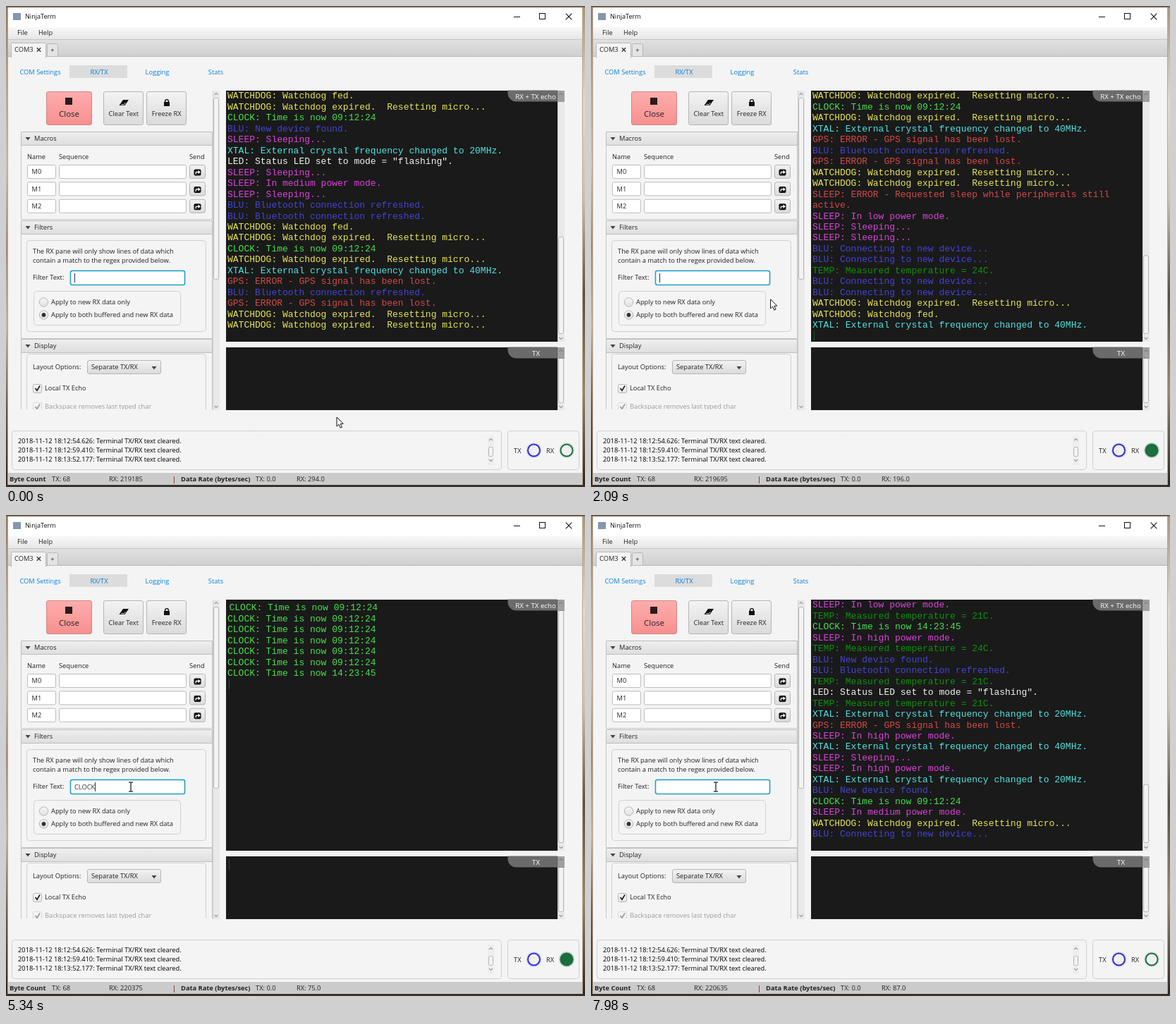
Recreate the animation shown at these times as an HTML page with a canvas. Size 821 by 682 pixels, loop 8000 ms.

```html
<!DOCTYPE html>
<html lang="en">
<head>
<meta charset="utf-8">
<title>NinjaTerm</title>
<style>
html, body { margin: 0; width: 100%; height: 100%; overflow: hidden; background: #f4f4f4; }
canvas { display: block; width: 821px; height: 682px; }
</style>
</head>
<body>
<canvas id="stage" width="821" height="682"></canvas>
<script>
const ctx = document.getElementById('stage').getContext('2d');
const LOOP = 8000;
const UI = '"Open Sans", "Noto Sans", sans-serif';
const MONO = '13px "Liberation Mono", "Courier New", monospace';

// ---- serial data ----
const MESSAGES = {
  f: 'WATCHDOG: Watchdog fed.',
  x: 'WATCHDOG: Watchdog expired.  Resetting micro...',
  c: 'CLOCK: Time is now 09:12:24',
  k: 'CLOCK: Time is now 14:23:45',
  n: 'BLU: New device found.',
  r: 'BLU: Bluetooth connection refreshed.',
  t: 'BLU: Connecting to new device...',
  s: 'SLEEP: Sleeping...',
  l: 'SLEEP: In low power mode.',
  m: 'SLEEP: In medium power mode.',
  h: 'SLEEP: In high power mode.',
  e: 'SLEEP: ERROR - Requested sleep while peripherals still active.',
  2: 'XTAL: External crystal frequency changed to 20MHz.',
  4: 'XTAL: External crystal frequency changed to 40MHz.',
  L: 'LED: Status LED set to mode = "flashing".',
  g: 'GPS: ERROR - GPS signal has been lost.',
  T: 'TEMP: Measured temperature = 24C.',
  U: 'TEMP: Measured temperature = 21C.'
};
const COLORS = {
  WATCHDOG: '#e8e655', CLOCK: '#48e04c', BLU: '#4444d2', SLEEP: '#dc42dc',
  XTAL: '#50e2e2', LED: '#f4f4f4', TEMP: '#0b930b'
};
const decode = keys => [...keys].map(k => MESSAGES[k]);
const HISTORY = decode('cccc' + 'f'.repeat(8) + 's'.repeat(17) + 'Ttx' + 'fxcns2Lsmsrrfxcx4grgxx');
const INCOMING = decode('elssttTttxf4slUkhTnrULU2gh4sh2ncmxt');
const ARRIVALS = [
  230, 390, 540, 690, 810, 890, 1150, 1310, 1460, 1700, 1850, 2085,
  2320, 2550, 2780, 2970, 3160, 4030, 4030, 4030,
  4720, 4800, 4880, 4950, 5030, 5110, 5190, 5270, 5340, 5430, 5600, 6270,
  6700, 7060, 7210
];
const FIRST_BYTES = 219185;
const OPEN_LINE = { count: 17, from: 3160, to: 4030 };   // newline still pending
const HELD = { count: 18, until: 4340 };                 // display lags the counter

// [time, value] steps
const FILTER = [[0, ''], [4340, 'C'], [4500, 'CL'], [4800, 'CLO'], [5000, 'CLOC'], [5200, 'CLOCK'],
  [5700, 'CLOC'], [5900, 'CLO'], [6430, 'CL'], [6510, 'C'], [7440, '']];
const RATE = [[0, 294], [800, 204], [1800, 196], [2800, 126], [3800, 249], [4800, 75], [5800, 45], [6800, 87]];
const stepAt = (steps, t) => steps.filter(s => s[0] <= t).pop();

// ---- drawing helpers ----
function text(str, x, mid, { size = 9.3, color = '#222', bold = false, align = 'left' } = {}) {
  ctx.font = `${bold ? 'bold ' : ''}${size}px ${UI}`;
  ctx.fillStyle = color;
  ctx.textAlign = align;
  ctx.fillText(str, x, mid + size * 0.36);
}
function rect(x, y, w, h, fill) {
  ctx.fillStyle = fill;
  ctx.fillRect(x, y, w, h);
}
function shade(y, h, ...stops) {
  const g = ctx.createLinearGradient(0, y, 0, y + h);
  stops.forEach((c, i) => g.addColorStop(i / (stops.length - 1), c));
  return g;
}
function box(x, y, w, h, r, fill, stroke, width = 1) {
  ctx.beginPath();
  ctx.roundRect(x + 0.5, y + 0.5, w - 1, h - 1, r);
  if (fill) { ctx.fillStyle = fill; ctx.fill(); }
  if (stroke) { ctx.strokeStyle = stroke; ctx.lineWidth = width; ctx.stroke(); }
}
function line(points, color, width = 1) {
  ctx.beginPath();
  points.forEach(p => ctx.lineTo(...p));
  ctx.strokeStyle = color;
  ctx.lineWidth = width;
  ctx.stroke();
}
function poly(points, fill) {
  ctx.beginPath();
  points.forEach(p => ctx.lineTo(...p));
  ctx.closePath();
  ctx.fillStyle = fill;
  ctx.fill();
}
function circle(x, y, r, fill, stroke, width = 1) {
  ctx.beginPath();
  ctx.arc(x, y, r, 0, Math.PI * 2);
  if (fill) { ctx.fillStyle = fill; ctx.fill(); }
  if (stroke) { ctx.strokeStyle = stroke; ctx.lineWidth = width; ctx.stroke(); }
}
function cross(x, y, r, color, width) {
  line([[x - r, y - r], [x + r, y + r]], color, width);
  line([[x - r, y + r], [x + r, y - r]], color, width);
}
const button = (x, y, w, h) => box(x, y, w, h, 2.5, shade(y, h, '#f3f3f3', '#dadada'), '#b6b6b6');
const downArrow = (x, y) => poly([[x - 3.5, y - 2], [x + 3.5, y - 2], [x, y + 2.5]], '#444');
function chevron(x, y, dir, color = '#999') {
  line([[x - 2.5, y + dir], [x, y - dir * 1.5], [x + 2.5, y + dir]], color, 1.1);
}
function scrollbar(x, top, bottom, thumbTop, thumbBottom) {
  rect(x, top, 10, bottom - top, '#e9e9e9');
  line([[x + 0.5, top], [x + 0.5, bottom]], '#d2d2d2');
  box(x + 1, thumbTop, 8, thumbBottom - thumbTop, 2, '#f3f3f3', '#b4b4b4');
  chevron(x + 5, top + 5, 1);
  chevron(x + 5, bottom - 5, -1);
}

// ---- window parts ----
function frame() {
  rect(0, 0, 821, 682, shade(0, 682, '#8d7763', '#b9a58d', '#cdbfae', '#a08a74', '#c8b6a0', '#6b5849', '#2c2622'));
  rect(817, 0, 4, 682, shade(0, 682, '#a8947f', '#e2dacd', '#cfc1b0', '#5a4d42', '#9a866f', '#2a2420'));
  rect(0, 0, 821, 2, '#6f5b49');
  rect(0, 679, 821, 3, '#3a312b');
  rect(2, 2, 816, 677, '#f4f4f4');
  rect(3, 3, 814, 27, '#fff');
  line([[2.5, 2], [2.5, 679]], '#b9a48e');
  line([[817.5, 2], [817.5, 679]], '#b9a48e');
  rect(10, 10, 11, 10, '#8497ae');
  text('NinjaTerm', 27, 15, { size: 9.1, color: '#111' });
  line([[720, 15.5], [729, 15.5]], '#111');
  ctx.strokeRect(756.5, 10.5, 8, 8);
  cross(798, 15, 4.3, '#111', 1.1);

  rect(3, 30, 814, 18, shade(30, 18, '#f8f8f8', '#e6e6e6'));
  text('File', 16, 38);
  text('Help', 46, 38);
  rect(3, 48, 814, 24, shade(48, 24, '#e0e0e0', '#cfcfcf'));
  line([[3, 47.5], [817, 47.5]], '#c6c6c6');
  line([[3, 71.5], [817, 71.5]], '#b8b8b8');
  box(7, 52, 50, 22, [2, 2, 0, 0], '#f4f4f4', '#b8b8b8');
  rect(8, 71, 48, 4, '#f4f4f4');
  text('COM3', 12, 62);
  cross(46.5, 62, 2.7, '#333', 1.3);
  box(58, 53, 16, 19, [2, 2, 0, 0], '#e4e4e4', '#b8b8b8');
  text('+', 66, 62.5, { align: 'center' });

  rect(90, 84, 82, 18, '#dcdcdc');
  [['COM Settings', 48.5], ['RX/TX', 132], ['Logging', 214.5], ['Stats', 297.5]]
    .forEach(([label, x]) => text(label, x, 94, { color: '#087fdd', align: 'center' }));
}

function actionButtons() {
  box(57, 121, 65, 48, 2.5, shade(121, 48, '#ffadad', '#f78f8f'), '#cf8585');
  rect(84, 130, 10, 10, '#2a1a1a');
  text('Close', 89.5, 153, { size: 11.5, align: 'center' });
  button(138, 121, 57, 48);
  poly([[160.5, 141], [166, 133], [174, 133], [168.5, 141]], '#111');
  line([[163.2, 139.8], [167.5, 139.8], [169.2, 137.4]], '#e2e2e2', 1);
  text('Clear Text', 166.7, 153, { align: 'center' });
  button(199, 121, 57, 48);
  rect(224, 136, 8, 6, '#111');
  ctx.beginPath();
  ctx.arc(228, 135, 2.4, Math.PI, 0);
  ctx.lineTo(230.4, 137);
  ctx.moveTo(225.6, 135);
  ctx.lineTo(225.6, 137);
  ctx.strokeStyle = '#111';
  ctx.lineWidth = 1.4;
  ctx.stroke();
  text('Freeze RX', 227.7, 153, { align: 'center' });
}

function pane(title, y, bottom) {
  box(21, y, 272, bottom - y, 0, '#f4f4f4', '#c6c6c6');
  box(21, y, 272, 20, [2, 2, 0, 0], shade(y, 20, '#efefef', '#dedede'), '#bdbdbd');
  downArrow(31, y + 10);
  text(title, 40, y + 10);
}

function macros() {
  pane('Macros', 178, 303);
  text('Name', 30, 214);
  text('Sequence', 75, 214);
  text('Send', 260, 214);
  for (let i = 0; i < 3; i++) {
    const y = 225 + i * 24.4;
    box(30, y, 41, 20, 2, '#fff', '#bcbcbc');
    text('M' + i, 36.5, y + 10);
    box(75, y, 181, 20, 2, '#fff', '#bcbcbc');
    button(260, y, 23, 20);
    box(266, y + 6, 11, 10, 2, '#111');
    line([[269, y + 13.5], [269.5, y + 10.5], [273.5, y + 10.5]], '#fff', 1.3);
    poly([[272.5, y + 7.8], [275.8, y + 10.5], [272.5, y + 13.2]], '#fff');
  }
}

function radio(y, on) {
  circle(53.5, y, 6.2, shade(y - 6, 12, '#f6f6f6', '#e2e2e2'), '#b5b5b5');
  if (on) circle(53.5, y, 2.9, '#333');
}

function filters(t) {
  pane('Filters', 304, 472);
  box(29, 332, 255, 130, 4, '#f4f4f4', '#d0d0d0');
  text('The RX pane will only show lines of data which', 38, 348);
  text('contain a match to the regex provided below.', 38, 361);
  text('Filter Text:', 38, 385);
  box(90, 374, 165, 22, 3, '#bfe3f0');
  box(91, 375, 163, 21, 2.5, '#fff', '#239fc9', 1.5);
  const [typedAt, value] = stepAt(FILTER, t);
  text(value, 97, 385.5, { color: '#333' });
  if ((t - typedAt) % 1000 < 500) {
    const x = Math.round(97 + ctx.measureText(value).width) + 0.5;
    line([[x, 379], [x, 392]], '#333');
  }
  box(39, 404, 209, 49, 4, '#f4f4f4', '#d0d0d0');
  radio(420, false);
  radio(438, true);
  text('Apply to new RX data only', 64, 420);
  text('Apply to both buffered and new RX data', 64, 438);
}

function checkbox(label, y) {
  box(38, y - 6, 13, 13, 2, shade(y - 6, 13, '#fafafa', '#e6e6e6'), '#b5b5b5');
  line([[41.5, y], [44, y + 3.2], [48, y - 3.5]], '#222', 1.7);
  text(label, 55, y);
}

function display() {
  ctx.save();
  ctx.beginPath();
  ctx.rect(18, 470, 276, 102);
  ctx.clip();
  pane('Display', 472, 600);
  box(29, 493, 255, 110, 4, '#f4f4f4', '#d0d0d0');
  text('Layout Options:', 38, 512);
  button(115, 502, 105, 20);
  text('Separate TX/RX', 121, 512);
  downArrow(210, 513);
  checkbox('Local TX Echo', 542);
  ctx.globalAlpha = 0.42;
  checkbox('Backspace removes last typed char', 568);
  ctx.restore();
}

// ---- terminal ----
const lineColor = s => /ERROR/.test(s) ? '#d64848' : COLORS[s.split(':')[0]];
const wrap = s => s.length > 60 ? [s.slice(0, 54), s.slice(55)] : [s];

function visibleRows(t, arrived) {
  const shown = t < HELD.until ? Math.min(arrived, HELD.count) : arrived;
  const pattern = new RegExp(stepAt(FILTER, t)[1]);
  return [...HISTORY, ...INCOMING.slice(0, shown)]
    .filter(s => pattern.test(s))
    .flatMap(s => wrap(s).map(str => ({ str, color: lineColor(s) })));
}

function termCaret(x, mid) {
  line([[x, mid - 7], [x, mid + 7]], '#0b6128');
}

function label(str, x, y) {
  box(711, y - 1, 71, 17, [0, 0, 0, 12], '#6b6b6b');
  rect(781, y, 11, 16, 'rgba(110,110,110,0.6)');
  text(str, x, y + 8.5, { size: 9.7, color: '#fff', align: 'center' });
}

function rxTerminal(t, arrived) {
  const PITCH = 15.476, PAGE = 23;
  const rows = visibleRows(t, arrived);
  const open = t >= OPEN_LINE.from && t < OPEN_LINE.to;
  const caretRow = open ? rows.length - 1 : rows.length;
  const top = Math.max(0, caretRow - PAGE + 1);
  const y0 = top ? 127.3 : 131.3;
  const isInset = i => i === 0 || (open && i === caretRow);

  rect(312, 120, 470, 356, '#1a1a1a');
  ctx.textAlign = 'left';
  ctx.font = MONO;
  rows.forEach(({ str, color }, i) => {
    if (i < top) return;
    ctx.fillStyle = color;
    ctx.fillText(str, isInset(i) ? 316.5 : 314, y0 + (i - top) * PITCH + 4);
  });
  if (t >= 300 && t < 7440) {
    const x = open ? 316.5 + rows[caretRow].str.length * 7.8 : 316.5;
    termCaret(x, y0 + (caretRow - top) * PITCH);
  }
  const thumb = 330 * Math.min(1, PAGE / (caretRow + 1));
  scrollbar(782, 120, 476, 465 - thumb, 465);
  label('RX + TX echo', 751, 120);
}

function txTerminal(t) {
  rect(312, 484, 470, 89, '#1a1a1a');
  if (t >= 3700 && t < 7440) termCaret(316.5, 495.5);
  scrollbar(782, 484, 573, 499, 563);
  label('TX', 751.5, 484);
}

// ---- bottom area ----
function led(x, rgb, level) {
  circle(x, 630, 11, `rgba(${rgb},${0.12 + level * 0.12})`);
  circle(x, 630, 8.5, '#f0f0f0');
  circle(x, 630, 8.5, `rgba(${rgb},${level})`, `rgb(${rgb})`, 2);
}

function bottom(t, arrived) {
  box(8, 602, 695, 56, 4, '#f4f4f4', '#cfcfcf');
  ['12:54.626', '12:59.410', '13:52.177'].forEach((time, i) =>
    text(`2018-11-12 18:${time}: Terminal TX/RX text cleared.`, 17, 617 + i * 12.6, { color: '#000' }));
  rect(683, 609, 9, 42, '#eee');
  chevron(687.5, 615, 1);
  chevron(687.5, 644, -1);
  box(684, 625, 7, 14, 2, '#f3f3f3', '#b4b4b4');

  box(711, 602, 102, 56, 4, '#f4f4f4', '#cfcfcf');
  text('TX', 720, 630.5);
  led(748.5, '46,46,222', 0);
  text('RX', 766, 630.5);
  const since = arrived ? t - ARRIVALS[arrived - 1] : Infinity;
  led(795, '27,110,60', Math.max(0, 1 - since / 680));

  const overhead = s => s.startsWith('TEMP') ? 7 : 9;
  const pending = t >= OPEN_LINE.from && t < OPEN_LINE.to ? 1 : 0;
  const bytes = INCOMING.slice(0, arrived).reduce((n, s) => n + s.length + overhead(s), FIRST_BYTES) - pending;
  rect(3, 662, 814, 17, '#cbcbcb');
  text('Byte Count', 5, 671, { bold: true });
  text('TX: 68', 65, 671);
  text('RX: ' + bytes, 146, 671);
  line([[238.5, 667], [238.5, 677]], '#9c3a3a');
  text('Data Rate (bytes/sec)', 248, 671, { bold: true });
  text('TX: 0.0', 354, 671);
  text(`RX: ${stepAt(RATE, t)[1].toFixed(1)}`, 412, 671);
}

// ---- mouse ----
function pointerAt(t) {
  const mix = (a, b, k) => a.map((v, i) => v + (b[i] - v) * k);
  const start = [469, 583], rest = [470, 583], bend = [255, 416], end = [177, 385.5];
  if (t < 1000) return start;
  if (t < 1500) return rest;
  if (t < 2090) return mix(rest, bend, ((t - 1500) / 590) ** 1.5);
  const k = Math.min(1, (t - 2090) / 410);
  return mix(bend, end, 1 - (1 - k) ** 2);
}

function pointer(t) {
  const [x, y] = pointerAt(t);
  if (x > 91 && x < 254 && y > 375 && y < 396) {
    line([[x, y - 6], [x, y + 6]], '#111', 1.2);
    line([[x - 3, y - 6.5], [x + 3, y - 6.5]], '#111', 1.2);
    line([[x - 3, y + 6.5], [x + 3, y + 6.5]], '#111', 1.2);
    return;
  }
  const shape = [[0, 0], [0, 13], [3, 10.3], [5.2, 15.2], [7.4, 14.2], [5.2, 9.5], [9.2, 9.3]]
    .map(([dx, dy]) => [x + dx, y + dy]);
  poly(shape, '#fff');
  line([...shape, shape[0]], '#111');
}

function draw() {
  const t = performance.now() % LOOP;
  const arrived = ARRIVALS.filter(a => a <= t).length;
  frame();
  actionButtons();
  macros();
  filters(t);
  display();
  scrollbar(293, 120, 573, 130, 388);
  rxTerminal(t, arrived);
  txTerminal(t);
  bottom(t, arrived);
  pointer(t);
  requestAnimationFrame(draw);
}
draw();
</script>
</body>
</html>
```
